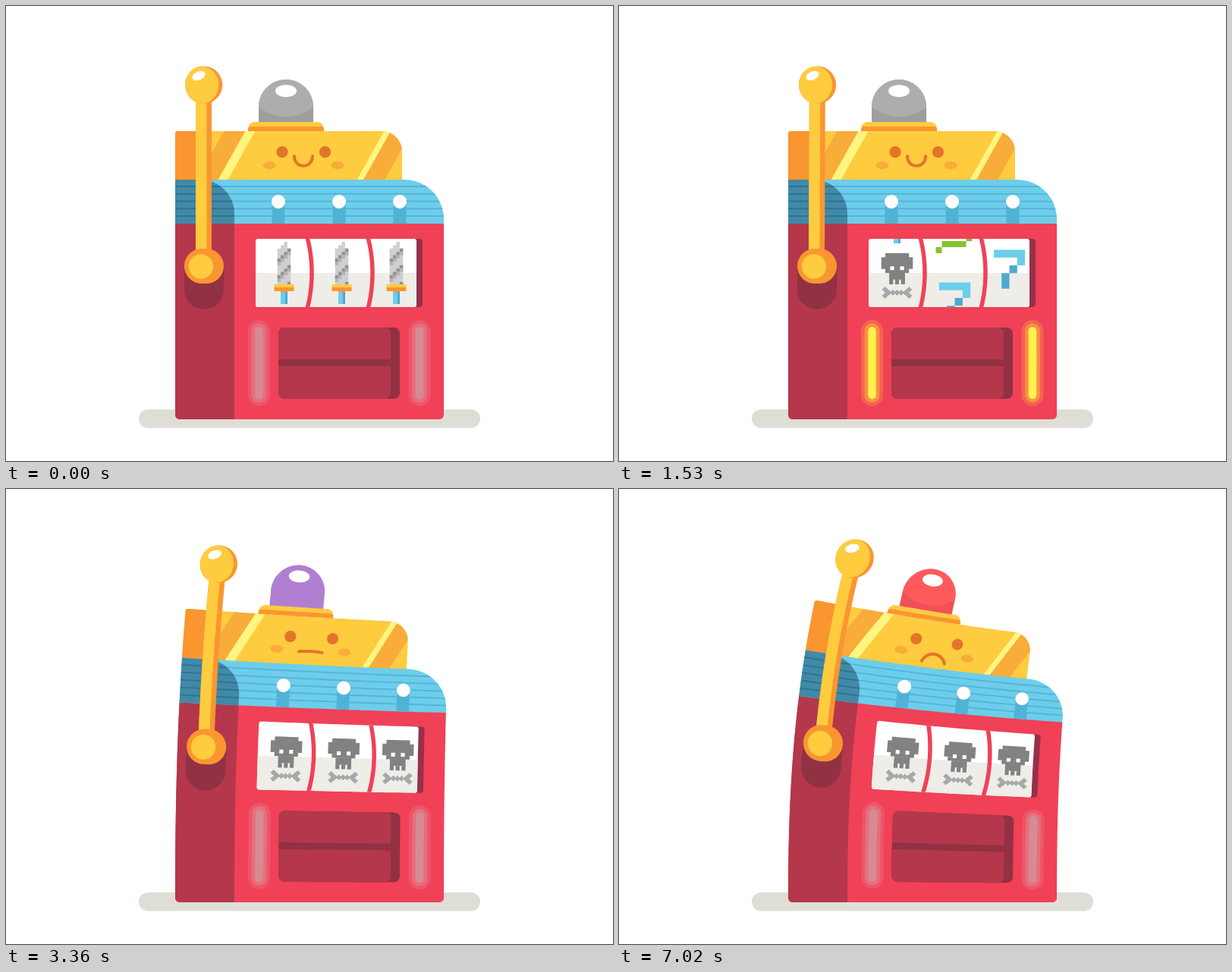
Write an HTML page with a canvas that moves like this. It is 800 px wide and 600 px high and loops after 7.11 s.

```html
<!DOCTYPE html>
<html lang="en">
<head>
<meta charset="utf-8">
<title>Slot machine</title>
<style>
  html, body { margin: 0; width: 100%; height: 100%; overflow: hidden; background: #fff; }
  canvas { display: block; }
</style>
</head>
<body>
<canvas id="stage" width="800" height="600"></canvas>
<script>
const ctx = document.getElementById('stage').getContext('2d');
const LOOP = 7110, STEP = 30, BASE = 545, AXIS = 370;
const GOLD = '#ffcb3f', AMBER = '#f8ac39', ORANGE = '#f99630', FACE = '#e27529';
const RED = '#f04157', WINE = '#b4374b', DEEP = '#923143';
const SKY = '#6dcdea', SEA = '#51a9d0';

const mix = (a, b, k) => a + (b - a) * k;
const mod = (a, n) => (a % n + n) % n;
const part = (t, from, length) => Math.min(1, Math.max(0, (t - from) / length));
const smooth = u => u * u * (3 - 2 * u);
const blend = (a, b, k) => a.map((v, i) => mix(v, b[i], k));
const rgb = c => `rgb(${c.map(Math.round)})`;

// The pull builds up, then springs back and rings out
function pull(t) {
  const u = t - 600;
  return u < 0 ? smooth(t / 600) : Math.exp(-u / 150) * Math.cos(u * Math.PI / 230);
}
const lean = t => .72 * pull(t) + smooth(part(t, 3060, 700))
  - .08 * Math.sin(Math.PI * part(t, 2880, 240));
const leverAngle = t => 94 * Math.max(0, pull(t)) * Math.PI / 180;
const mood = t => 2 * smooth(part(t, 2980, 760));

const REELS = [
  { x: 366.5, turns: 1, stop: 1550 },
  { x: 442.5, turns: 3, stop: 2540 },
  { x: 514.5, turns: 3, stop: 2620 }
];
function spin({ turns, stop }, t) {
  const u = part(t, 400, stop - 400);
  return (280 + 360 * turns) * (1 - (1 - u * u) ** 3);
}

// The whole machine bends sideways above its base
let bend = 0, place = p => p;
function warp(p) {
  const [x, y] = place(p);
  const h = Math.max(0, BASE - y), d = x - AXIS;
  return [
    x + bend * (h / 100) ** 2.35 * (1.42 - .0017 * d - 6.5e-6 * d * d),
    y + bend * h * (d * (4e-4 - 3.5e-7 * d) + 4.6e-5 * h)
  ];
}

function trace(pts, closed = true) {
  ctx.moveTo(...warp(pts[0]));
  const n = pts.length;
  for (let i = 1; i < n + (closed ? 1 : 0); i++) {
    const [ax, ay] = pts[i - 1], [bx, by] = pts[i % n];
    const k = Math.max(1, Math.ceil(Math.hypot(bx - ax, by - ay) / 12));
    for (let j = 1; j <= k; j++) ctx.lineTo(...warp([mix(ax, bx, j / k), mix(ay, by, j / k)]));
  }
  if (closed) ctx.closePath();
}
function fill(color, ...shapes) {
  ctx.beginPath();
  shapes.forEach(s => trace(s));
  ctx.fillStyle = color;
  ctx.fill();
}
function line(color, width, pts, cap = 'butt') {
  ctx.beginPath();
  trace(pts, false);
  ctx.strokeStyle = color;
  ctx.lineWidth = width;
  ctx.lineCap = cap;
  ctx.stroke();
}
function within(shape, draw) {
  ctx.save();
  ctx.beginPath();
  trace(shape);
  ctx.clip();
  draw();
  ctx.restore();
}

function arc(cx, cy, rx, ry, from, to, n = 12) {
  return Array.from({ length: n + 1 }, (_, i) => {
    const a = mix(from, to, i / n);
    return [cx + rx * Math.cos(a), cy + ry * Math.sin(a)];
  });
}
function oval(cx, cy, rx, ry = rx, turn = 0) {
  const c = Math.cos(turn), s = Math.sin(turn);
  return arc(0, 0, rx, ry, 0, Math.PI * 2, 40).map(([x, y]) => [cx + x * c - y * s, cy + x * s + y * c]);
}
// Box by its edges, with corner radii from top left clockwise
function box(l, t, r, b, tl = 0, tr = tl, br = tl, bl = tl) {
  const q = Math.PI / 2;
  const corner = (x, y, rad, a) => rad ? arc(x, y, rad, rad, a, a + q) : [[x, y]];
  return [
    ...corner(l + tl, t + tl, tl, 2 * q), ...corner(r - tr, t + tr, tr, 3 * q),
    ...corner(r - br, b - br, br, 0), ...corner(l + bl, b - bl, bl, q)
  ];
}
function cubic(a, b, c, d) {
  return Array.from({ length: 21 }, (_, i) => {
    const u = i / 20, w = 1 - u;
    return [0, 1].map(k => w * w * w * a[k] + 3 * w * w * u * b[k] + 3 * w * u * u * c[k] + u * u * u * d[k]);
  });
}

// Pixel art: one cell grid with its origin at the symbol's top left
const grid = (x, y, size) => (c, r, w = 1, h = 1) =>
  box(x + c * size, y + r * size, x + (c + w) * size, y + (r + h) * size);

// Reel symbols, drawn around their centre
function sword(x, cy) {
  const y = cy - 41, cell = grid(x - 8.8, y, 4.4);
  fill('#cfcfd1', cell(2, 0), cell(1, 1, 2), cell(0, 2, 4, 11));
  for (let r = 2; r < 13; r++)
    for (let c = 0; c < 4; c++) {
      const twist = (r + c) % 5;
      if (twist < 2) fill(twist ? '#b3b3b6' : '#929295', cell(c, r));
    }
  fill(GOLD, box(x - 13, y + 56, x + 13, y + 61));
  fill(ORANGE, box(x - 13, y + 60, x + 13, y + 65), box(x - 4.5, y + 65, x + 4.5, y + 67));
  fill(SKY, box(x - 4.5, y + 66, x + 1, y + 82));
  fill(SEA, box(x + 1, y + 66, x + 4.5, y + 82));
}
function seven(x, cy) {
  const cell = grid(x - 20.6, cy - 25.5, 10.3);
  fill(SKY, cell(0, 0, 4), cell(3, 1));
  fill(SEA, cell(2, 2), cell(1, 3, 1, 2));
}
function snake(x, cy) {
  const cell = grid(x - 25, cy - 28, 8);
  for (let r = 0; r < 7; r++)
    fill('#86c232', r % 2 ? cell(1, r, 4) : cell(r === 4 ? 5 : r ? 0 : 4, r));
}
function skull(x, cy) {
  const cell = grid(x - 20.8, cy - 30, 5.2);
  fill('#828282', cell(1, 0, 6), cell(0, 1, 8, 3), cell(1, 4, 6), cell(2, 5, 4, 1.7),
    ...[2, 3.5, 5].map(c => cell(c, 6.7, 1, 1.2)));
  fill('#fff', cell(2.25, 3.3), cell(4.75, 3.3));
  const m = cy + 22;
  [-1, 1].forEach(k => fill('#a6a8ac',
    [[20, -4], [16, -8], [7, 0], [16, 8], [20, 4], [15.5, 0]].map(([a, b]) => [x + a * k, m + b])));
  [-5.5, 0, 5.5].forEach(a =>
    fill('#a6a8ac', [[x + a - 4, m], [x + a, m - 4], [x + a + 4, m], [x + a, m + 4]]));
}
const STRIP = [sword, seven, snake, skull];

function drawWindow(t) {
  fill('#98304a', box(500, 307, 549, 397, 4));
  const pane = box(329, 307, 541, 397, 3);
  fill('#fff', pane);
  within(pane, () => {
    fill('#eeede8', box(329, 352, 541, 397));
    const won = t > 2880;
    REELS.forEach(reel => STRIP.forEach((draw, i) => {
      const y = mod(spin(reel, t) - 92 * i + 180, 360) - 180;
      if (Math.abs(y) < 95 && (!won || draw === skull)) draw(reel.x, 352 + y);
    }));
    [397, 477].forEach(x =>
      line(RED, 5.5, cubic([x, 305], [x + 8, 335], [x + 8, 369], [x, 399])));
  });
}

function drawBody(t) {
  const lit = t >= 480 && t < 2940;
  fill(RED, box(223, 286, 577, BASE, 0, 0, 6, 6));
  fill(WINE, box(223, 286, 301, BASE, 0, 0, 0, 6));

  const roof = box(223, 229, 577, 287, 0, 52, 0, 0), side = box(223, 229, 301, 287, 0, 45, 0, 0);
  const lamps = [359, 439, 519];
  const rules = color => {
    for (let y = 238; y < 280; y += 9.75) line(color, 1.8, [[223, y], [577, y]]);
  };
  fill(SKY, roof);
  within(roof, () => {
    rules('#52b5d7');
    lamps.forEach(x => fill('#50b3d6', box(x - 8.5, 258, x + 8.5, 287)));
  });
  fill('#4089a7', side);
  within(side, () => rules('#2f7291'));
  lamps.forEach(x => fill('#fff', oval(x, 258, 9)));

  drawWindow(t);

  fill(DEEP, box(359, 424, 519, 518, 8));
  fill(WINE, box(359, 424, 507, 466, 8, 8, 0, 0), box(359, 475, 507, 518, 0, 0, 8, 8));

  const glow = lit ? ['#f4634f', '#f99045', '#fff14b'] : ['#ee5569', '#e66f7f', '#d68b93'];
  [333.5, 545].forEach(x => glow.forEach((color, i) => {
    const m = 4.6 * i, w = 14.5 - m;
    fill(color, box(x - w, 414 + m, x + w, 527.5 - m, w));
  }));
}

// Main and shade colours of the bulb
function bulbColors(t) {
  const grey = [[173, 173, 173], [158, 158, 158]];
  const purple = [176, 127, 209];
  const red = [[255, 90, 91], [240, 80, 87]];
  const blink = ms => {
    const p = mod(ms, 1050);
    return p < 300 || (p >= 690 && p < 810) ? 1 : 0;
  };
  const k = t < 3480 ? 0 : (blink(t) + blink(t - STEP)) / 2;
  const on = part(t, 2970, 60);
  return [0, 1].map(i => rgb(blend(grey[i], blend(purple, red[i], k), on)));
}

function drawHead(t) {
  const [main, shade] = bulbColors(t);
  fill(shade, box(333, 97, 405, 155, 36, 36, 0, 0));
  fill(main, [...arc(369, 133, 36, 36, Math.PI, Math.PI * 2, 30), ...arc(369, 90, 56, 56, .872, Math.PI - .872)]);
  fill('#fff', oval(369, 112, 14, 8));

  const head = box(223, 165, 522, 230, 3, 27, 0, 0);
  fill(GOLD, head);
  within(head, () => {
    const slant = (color, x, w) =>
      fill(color, [[x, 164], [x + w, 164], [x + w - 37, 230], [x - 37, 230]]);
    slant(AMBER, 288, 28);
    slant('#fff580', 316, 13);
    slant(AMBER, 507, 28.5);
    slant('#fff580', 499, 8.5);
    fill(ORANGE, box(222, 164, 251, 230));
  });
  fill(GOLD, box(319, 153, 419, 165, 9, 9, 0, 0));
  fill(ORANGE, box(319, 159, 419, 165, 4, 4, 0, 0));

  [364, 420.5].forEach(x => fill(FACE, oval(x, 192.5, 7.6)));
  [347, 437].forEach(x => fill(AMBER, oval(x, 210, 8.5, 5)));

  // Half width, end height, handle half width, handle height
  const smile = [12, 198, 12, 215], flat = [15.5, 212, 6, 210.5], frown = [15.5, 221, 10, 206];
  const m = mood(t);
  const [w, y, hw, hy] = m < 1 ? blend(smile, flat, m) : blend(flat, frown, m - 1);
  line(FACE, 4, cubic([392 - w, y], [392 - hw, hy], [392 + hw, hy], [392 + w, y]), 'round');
}

function drawLever(t) {
  const a = leverAngle(t), c = Math.cos(a), s = Math.sin(a);
  const px = 261, py = 343.5, slide = -4.5 * s;
  fill(DEEP, box(235, 344, 287, 400, 0, 0, 26, 26));
  place = ([x, y]) => [
    px + slide + (x - px) * c - (y - py) * s,
    py + (x - px) * s + (y - py) * c
  ];
  fill(ORANGE, box(250, 110, 271, 340));
  fill(GOLD, box(250, 110, 264.5, 340));
  fill(ORANGE, oval(260.7, 104, 24.6));
  fill(GOLD, oval(258.2, 104, 22, 24.4));
  fill('#fff', oval(254, 92, 9, 5.5, -.42));
  place = ([x, y]) => [x + slide, y];
  fill(ORANGE, box(235, 320, 287, 366, 23));
  fill(GOLD, oval(257, 343.5, 16.2));
  place = p => p;
}

function draw(t) {
  ctx.fillStyle = '#fff';
  ctx.fillRect(0, 0, 800, 600);
  bend = 0;
  fill('#deded6', box(175, 532, 625, 556.5, 12.2));
  bend = lean(t);
  drawHead(t);
  drawBody(t);
  drawLever(t);
}

const start = performance.now();
function tick() {
  const t = (performance.now() - start) % LOOP;
  draw(Math.floor(t / STEP) * STEP);
  requestAnimationFrame(tick);
}
tick();
</script>
</body>
</html>
```
